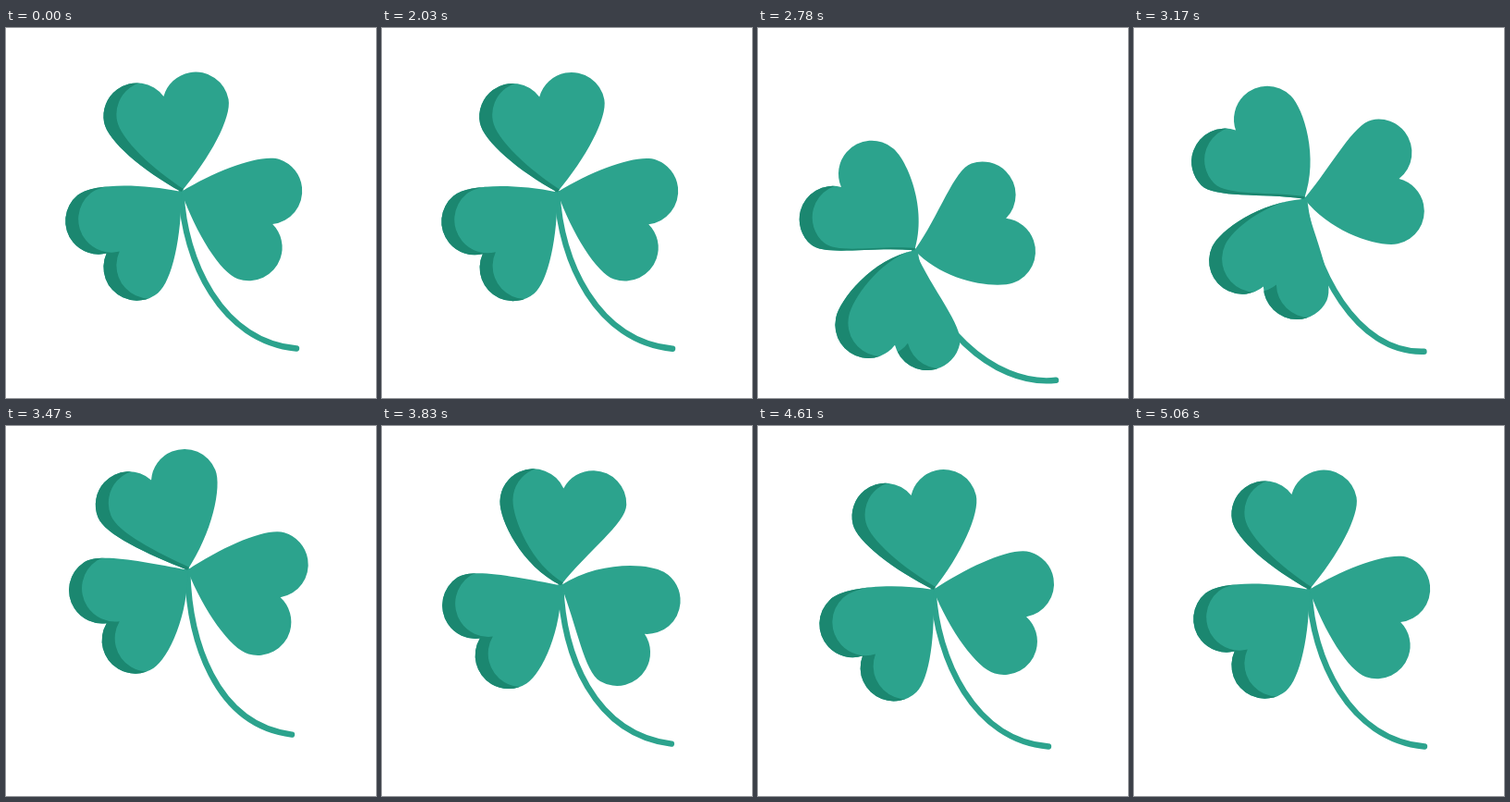
Write an HTML page with a canvas that moves like this. It is 400x400 px and loops after 5.09 s.

```html
<!DOCTYPE html>
<html lang="en">
<head>
<meta charset="utf-8">
<title>Clover</title>
<style>
  html, body { margin: 0; width: 100%; height: 100%; overflow: hidden; background: #fff; }
  canvas { display: block; width: 400px; height: 400px; }
</style>
</head>
<body>
<canvas id="stage"></canvas>
<script>
const LOOP = 5090, START = 2030, STEP = 30;
const LIGHT = '#2ca38d', DARK = '#1b8770';
const RAD = Math.PI / 180;
const LOBE = { x: 32.4, y: 89, r: 36 };
const NOTCH = Math.acos(LOBE.x / LOBE.r);

const canvas = document.getElementById('stage');
const ctx = canvas.getContext('2d');
const dpr = window.devicePixelRatio || 1;
canvas.width = canvas.height = 400 * dpr;
ctx.scale(dpr, dpr);

const clamp = (v, lo, hi) => Math.min(hi, Math.max(lo, v));

// Eases from one value to the next, at rest at every given time
function swing(t, times, values) {
  let i = 0;
  while (i < times.length - 2 && t > times[i + 1]) i++;
  const u = clamp((t - times[i]) / (times[i + 1] - times[i]), 0, 1);
  return values[i] + (values[i + 1] - values[i]) * u * u * (3 - 2 * u);
}

// The plant dips, springs up past its resting place and settles
const bob = (t, dip, lift) => swing(t, [2000, 2640, 3490, 3980], [0, dip, lift, 0]);

// Leaves with more lag swing back later and further
const sway = (t, lag) =>
  swing(t, [2000, 2940, 3540 + 200 * lag, 4740, 5060], [0, -42, 8 + 3 * lag, -4, 0]);

// Maps leaf coordinates (y runs from the tip outward) to the stage
function mapper(hub, a, isFace) {
  const c = Math.cos(a), s = Math.sin(a);
  return (x, y) => {
    const push = isFace ? Math.min(14, 4 + 0.13 * Math.hypot(x, y)) : 0;
    const rise = isFace ? 2 : 0;
    return [hub.x + x * c + y * s + push, hub.y + x * s - y * c - rise];
  };
}

function heart(hub, turn, a, isFace) {
  const at = mapper(hub, a, isFace);
  // The base bends against the turn, as the blade trails behind the tip
  const bend = clamp(turn < 0 ? -0.4 * turn : -1.2 * turn, -15, 17);
  const base = side => {
    const w = (side * 51 + bend) * RAD;
    return at(47.6 * Math.sin(w), 47.6 * Math.cos(w));
  };
  const { x, y, r } = LOBE, w = x + r;
  const p = new Path2D();
  p.moveTo(...at(0, 0));
  p.bezierCurveTo(...base(1), ...at(w, 69), ...at(w, y));
  p.arc(...at(x, y), r, a, a - Math.PI + NOTCH, true);
  p.arc(...at(-x, y), r, a - NOTCH, a - Math.PI, true);
  p.bezierCurveTo(...at(-w, 69), ...base(-1), ...at(0, 0));
  p.closePath();
  return p;
}

function clipOutside(path) {
  const p = new Path2D();
  p.rect(-50, -50, 500, 500);
  p.addPath(path);
  ctx.clip(p, 'evenodd');
}

// shaded: how many lobes show a dark side
function drawLeaf(hub, turn, angle, shaded) {
  const a = (angle + turn) * RAD;
  const shape = heart(hub, turn, a, false);
  ctx.fillStyle = LIGHT;
  ctx.fill(shape);
  if (!shaded) return;
  ctx.save();
  ctx.clip(shape);
  clipOutside(heart(hub, turn, a, true));
  if (shaded === 1) {
    const lobe = new Path2D();
    lobe.arc(...mapper(hub, a, false)(LOBE.x, LOBE.y), LOBE.r + 1, 0, 2 * Math.PI);
    clipOutside(lobe);
  }
  ctx.fillStyle = DARK;
  ctx.fillRect(0, 0, 400, 400);
  ctx.restore();
}

function drawStem(hub, t) {
  const x = 314 + bob(t, 9, -5), y = 346.5 + bob(t, 38, -13);
  const bend = -sway(t, 0) / 37;
  ctx.beginPath();
  ctx.moveTo(hub.x, hub.y + 1);
  ctx.bezierCurveTo(hub.x + 3 + 8 * bend, hub.y + 74,
    x - 82 + 12 * bend, y - 8 + 15 * bend, x, y);
  ctx.lineWidth = 6.4;
  ctx.lineCap = 'round';
  ctx.strokeStyle = LIGHT;
  ctx.stroke();
}

function draw(t) {
  // Sideways drift trails the vertical move a little
  const hub = { x: 189.5 + bob(t - 90, -20.5, 8), y: 177 + bob(t, 70, -21.5) };
  ctx.fillStyle = '#fff';
  ctx.fillRect(0, 0, 400, 400);
  drawStem(hub, t);
  drawLeaf(hub, sway(t, 1), 109.5, 0);
  drawLeaf(hub, sway(t, 0), 230.5, 2);
  drawLeaf(hub, sway(t, 2), -10.5, 1);
}

const begin = performance.now();
function tick() {
  const t = Math.max(0, performance.now() - begin) % LOOP;
  draw(t < START ? 0 : START + STEP * Math.floor((t - START) / STEP));
  requestAnimationFrame(tick);
}
tick();
</script>
</body>
</html>
```
